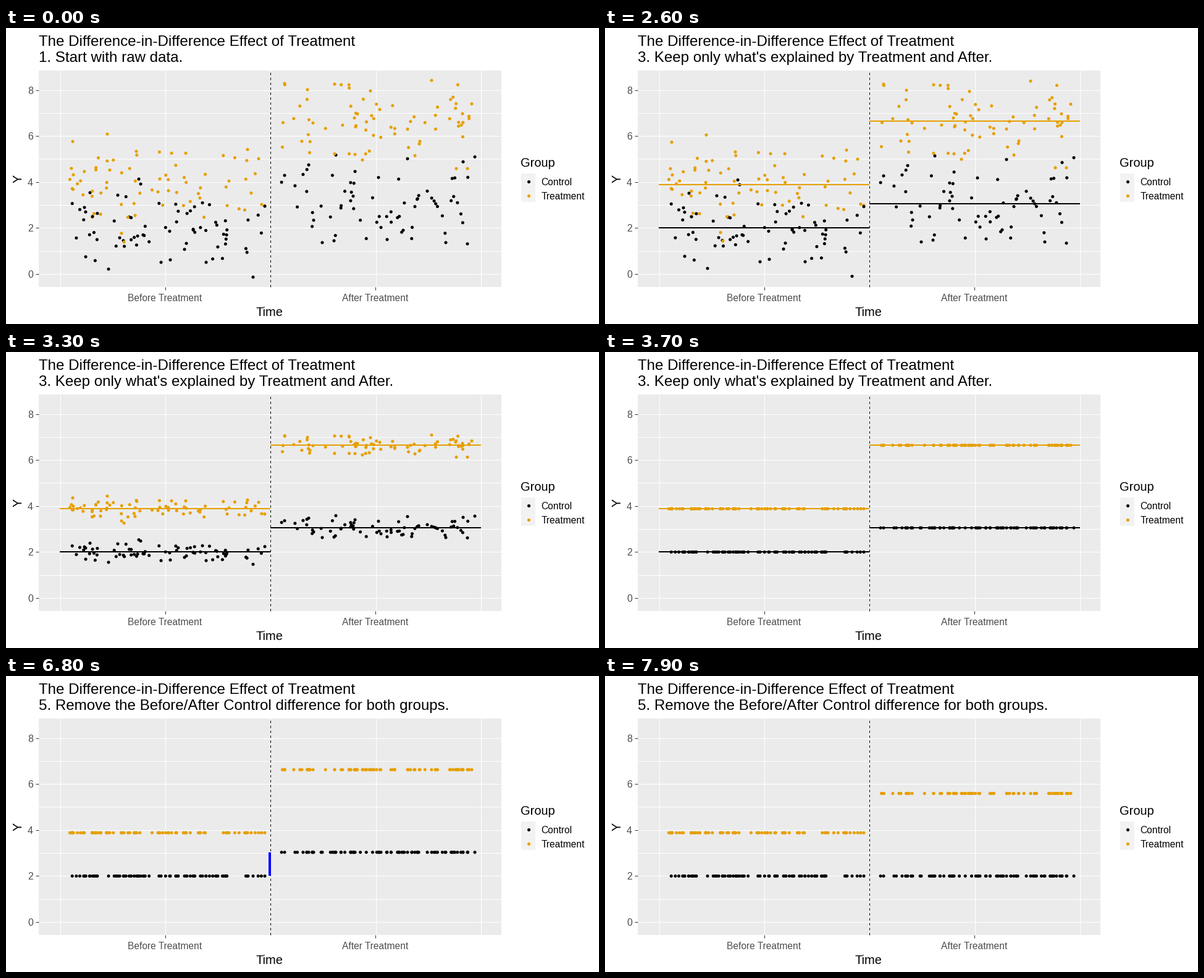
A matplotlib script for the animation above (8 s loop, 960 px wide and 480 px high).

```python
import numpy as np
import matplotlib.pyplot as plt
from matplotlib.animation import FuncAnimation
from matplotlib.patches import Rectangle

W, H, DPI = 960, 480, 100
PX = 72 / DPI                       # points per pixel
FRAMES, STEP_MS = 80, 100
ORANGE, BLACK = "#E69F00", "#000000"
LEFT, RIGHT, TOP, BOTTOM = 53, 802, 69, 420
MID = 427.5
SHIFT = 1.05                        # change of the control mean

HEADING = "The Difference-in-Difference Effect of Treatment"
STEPS = [
    (0, "1. Start with raw data."),
    (5, "2. Explain Y using Treatment and After."),
    (26, "3. Keep only what's explained by Treatment and After."),
    (47, "4. See how Control changed Before to After."),
    (68, "5. Remove the Before/After Control difference for both groups."),
]

plt.rcParams["font.family"] = "Liberation Sans"
rng = np.random.default_rng(11)


def y_px(value):
    return 399 - 37.31 * value


def cloud(mean, x0, x1, count, extremes):
    """Scattered points around a mean, plus the most outlying ones."""
    far = np.array(extremes, float)
    n = count - len(far)
    x = np.concatenate([far[:, 0], rng.uniform(x0, x1, n)])
    noise = np.clip(rng.normal(0, 28, n), -56, 56)
    noise -= noise.mean()
    y = np.concatenate([far[:, 1], y_px(mean) + noise])
    return x, y


# mean, colour, after?, count, outlying points
GROUPS = [
    (3.88, ORANGE, False, 73,
     [(108, 184), (164, 172), (211, 200), (268, 203), (291, 203), (391, 197),
      (409, 212), (187, 333), (191, 347), (209, 304), (153, 302), (358, 288)]),
    (2.00, BLACK, False, 73,
     [(129, 371), (166, 391), (400, 404), (251, 380), (266, 376), (324, 380),
      (289, 359), (215, 245), (218, 253), (136, 267), (127, 291), (419, 289)]),
    (6.64, ORANGE, True, 75,
     [(451, 90), (488, 100), (532, 91), (590, 102), (689, 85), (754, 123),
      (739, 139), (565, 205), (577, 214), (662, 207), (729, 228), (747, 228)]),
    (3.05, BLACK, True, 71,
     [(451, 239), (490, 222), (534, 206), (650, 212), (740, 217), (759, 209),
      (512, 348), (531, 345), (617, 343), (712, 348), (747, 350), (643, 328)]),
]

fig = plt.figure(figsize=(W / DPI, H / DPI), dpi=DPI, facecolor="white")
ax = fig.add_axes([0, 0, 1, 1])
ax.set_xlim(0, W)
ax.set_ylim(H, 0)
ax.axis("off")


def text(x, y, s, size, color=BLACK, **kw):
    return ax.text(x, y, s, fontsize=size * PX, color=color, va="baseline", **kw)


def line(xs, ys, color, width=1, z=1, **kw):
    return ax.plot(xs, ys, color=color, lw=width * PX, zorder=z,
                   solid_capstyle="butt", dash_capstyle="butt", **kw)[0]


def box(x, y, w, h, color):
    ax.add_patch(Rectangle((x, y), w, h, facecolor=color, lw=0, zorder=0))


def dots(x, y, colors):
    return ax.scatter(x, y, s=(5.1 * PX) ** 2, c=colors, linewidths=0, zorder=3)


# Panel, grid and axes
box(LEFT, TOP, RIGHT - LEFT, BOTTOM - TOP, "#EBEBEB")
for v in range(9):
    if v < 8 or v % 2 == 0:
        line([LEFT, RIGHT], [y_px(v)] * 2, "white")
for x in (87.5, 257.5, MID, 598.5, 768.5):
    line([x, x], [TOP, BOTTOM], "white")
for v in range(0, 9, 2):
    line([48, LEFT], [y_px(v)] * 2, "#333333")
    text(44, y_px(v) + 6, str(v), 16, "#4D4D4D", ha="right")
for x, label in ((257.5, "Before Treatment"), (598, "After Treatment")):
    line([x, x], [BOTTOM, BOTTOM + 5], "#333333")
    text(x - 0.5, 443, label, 15.55, "#4D4D4D", ha="center")
text(426.8, 467, "Time", 20, ha="center")
text(26, 244, "Y", 20, ha="center", rotation=90, rotation_mode="anchor")

# Legend
text(833.5, 225, "Group", 20)
box(834, 236, 23, 46, "#F2F2F2")
for y, color, label in ((248.5, BLACK, "Control"), (271.5, ORANGE, "Treatment")):
    dots([846], [y], [color])
    text(866.7, y + 6.5, label, 15.5)

# Titles
text(53, 29, HEADING, 24.1)
subtitle = text(53, 55, "", 24.1)

# Data
parts, mean_lines = [], []
for mean, color, after, count, extremes in GROUPS:
    x0, x1 = (438, 760) if after else (98, 420)
    x, y = cloud(mean, x0, x1, count, extremes)
    parts.append((x, y, np.full(count, y_px(mean)), np.full(count, float(after)),
                  np.full(count, color)))
    ends = [MID, 768.5] if after else [87, MID]
    mean_lines.append(line(ends, [y_px(mean)] * 2, color, 2, z=5))
order = rng.permutation(sum(len(p[0]) for p in parts))
xs, raw, means, is_after, colors = (np.concatenate(c)[order] for c in zip(*parts))

points = dots(xs, raw, colors)
line([MID, MID], [BOTTOM, TOP], BLACK, z=4, linestyle=(0, (4, 4)))
gap = line([427, 427], [0, 0], "#0000FF", 4, z=6)


def ease(frame, start, steps=12):
    k = np.clip(frame - start, 0, steps)
    return (1 - np.cos(np.pi * k / steps)) / 2


def update(frame):
    subtitle.set_text([s for start, s in STEPS if frame >= start][-1])
    collapse, drop = ease(frame, 25), ease(frame, 67)
    fall = SHIFT * 37.31 * drop
    ys = raw + (means - raw) * collapse + fall * is_after
    points.set_offsets(np.column_stack([xs, ys]))
    for m in mean_lines:
        m.set_visible(9 <= frame < 47)
    gap.set_visible(frame >= 51 and drop < 1)
    gap.set_ydata([y_px(2), y_px(2 + SHIFT) + fall])
    return [subtitle, points, gap, *mean_lines]


anim = FuncAnimation(fig, update, frames=FRAMES, interval=STEP_MS,
                     repeat=True, repeat_delay=0, blit=False)
plt.show()
```
